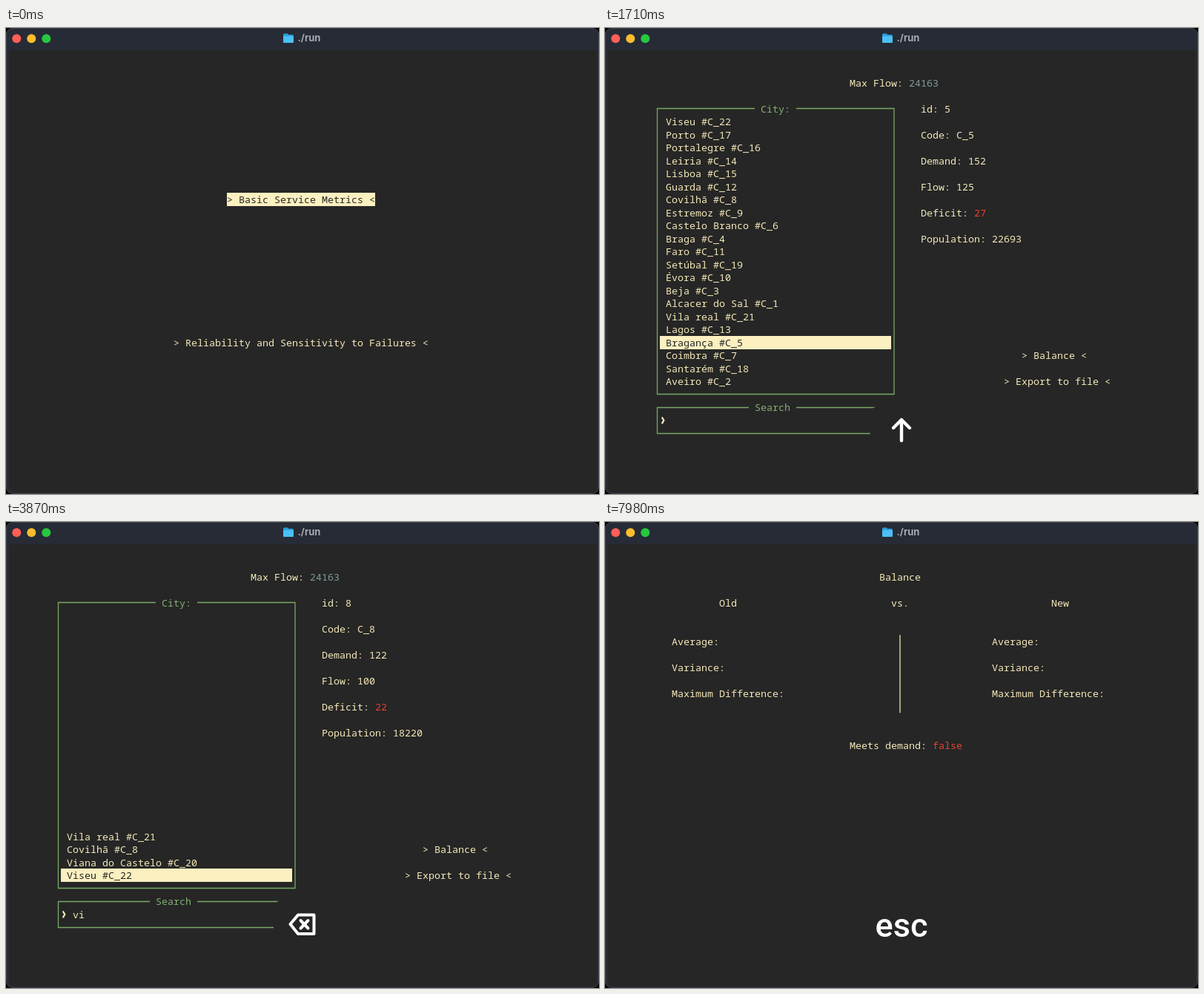
These frames come from a looping animation (800x628 px, 8000 ms). An HTML page with a canvas:

```html
<!DOCTYPE html>
<html lang="en">
<head>
<meta charset="utf-8">
<title>./run</title>
<style>
html, body { margin: 0; width: 100%; height: 100%; overflow: hidden; background: #000; }
canvas { display: block; width: 800px; height: 628px; }
</style>
</head>
<body>
<canvas id="stage" width="800" height="628"></canvas>
<script>
const ctx = document.getElementById('stage').getContext('2d');
const LOOP = 8000, LAG = 20, SETTLE = 330, HOLD = 840, FADE = 90;
const MONO = '500 13.333px "Noto Sans Mono", "DejaVu Sans Mono", monospace';
const C = {
  bg: '#262626', text: '#f4e8b8', bar: '#fcf0c0', green: '#83b072', line: '#78a866',
  slate: '#7f9a9a', olive: '#b5a824', red: '#e8412f'
};

const names = ['', 'Alcacer do Sal', 'Aveiro', 'Beja', 'Braga', 'Bragança', 'Castelo Branco',
  'Coimbra', 'Covilhã', 'Estremoz', 'Évora', 'Faro', 'Guarda', 'Lagos', 'Leiria', 'Lisboa',
  'Portalegre', 'Porto', 'Santarém', 'Setúbal', 'Viana do Castelo', 'Vila real', 'Viseu'];
// Both orders run from the bottom row upwards.
const startOrder = [2, 18, 7, 5, 13, 21, 1, 3, 10, 19, 11, 4, 6, 9, 8, 12, 15, 14, 16, 17, 22, 20];
const searchOrder = [22, 16, 14, 20, 12, 8, 19, 17, 10, 3, 9, 11, 21, 4, 13, 15, 1, 6, 5, 7, 18, 2];
// id: [demand, flow, population]
const stats = {
  2: [361, 361, 54162], 5: [152, 125, 22693], 7: [705, 705, 105842], 8: [122, 100, 18220],
  13: [151, 151, 22516], 16: [96, 96, 14318], 18: [200, 200, 30021], 21: [198, 198, 29574],
  22: [397, 330, 59469]
};
const keys = [
  [420, 'enter'], [1230, 'up'], [1440, 'up'], [1650, 'up'], [1860, 'up'],
  [2070, 'V'], [2250, 'I'], [2430, 'L'], [2610, 'A'],
  [3180, 'back'], [3540, 'back'], [3990, 'back'], [4290, 'back'], [4650, 'R'],
  [5760, 'back'], [6090, 'back'], [6570, 'right'], [7140, 'enter'], [7980, 'esc']
];

function stateAt(t) {
  const s = { screen: 'menu', list: startOrder, sel: 0, detail: 2, query: '', onButton: false };
  for (const [at, key] of keys) {
    if (t < at + LAG) break;
    if (key === 'enter') s.screen = s.onButton ? 'balance' : 'flow';
    else if (key === 'up') s.detail = s.list[++s.sel];
    else if (key === 'right') s.onButton = true;
    else {
      // The details follow the search one keystroke behind.
      s.detail = s.list[s.sel];
      s.query = key === 'back' ? s.query.slice(0, -1) : s.query + key.toLowerCase();
      s.list = searchOrder.filter(id => names[id].toLowerCase().includes(s.query));
      s.sel = 0;
    }
  }
  return s;
}

const cx = col => 2 + col * 8;
const rowTop = row => 29.75 + row * 17.5;
const mid = row => rowTop(row) + 8.75;

function print(col, row, str, color = C.text) {
  ctx.font = MONO;
  ctx.fillStyle = color;
  ctx.fillText(str, cx(col), Math.floor(mid(row) + 5.5));
}

function bar(col, row, cells) {
  ctx.fillStyle = C.bar;
  ctx.fillRect(cx(col), Math.round(rowTop(row)), cells * 8, 18);
}

function button(col, row, label, on) {
  const str = `> ${label} <`;
  if (on) bar(col, row, str.length);
  print(col, row, str, on ? C.bg : C.text);
}

function path(points, color, width, close) {
  ctx.beginPath();
  points.forEach(([x, y]) => ctx.lineTo(x, y));
  if (close) ctx.closePath();
  ctx.strokeStyle = color;
  ctx.lineWidth = width;
  ctx.stroke();
}

function box(top, bottom, col, title) {
  const y1 = Math.floor(mid(top)) + 0.5, y2 = Math.floor(mid(bottom)) + 0.5;
  path([[cx(col - 1), y1], [70.5, y1], [70.5, y2], [390, y2], [390, y1], [258, y1]], C.line, 1.3);
  print(col, top, title, C.green);
}

function roundRect(x, y, w, h, r, color) {
  ctx.beginPath();
  ctx.roundRect(x, y, w, h, r);
  ctx.fillStyle = color;
  ctx.fill();
}

function drawWindow() {
  ctx.fillStyle = '#000';
  ctx.fillRect(0, 0, 800, 628);
  roundRect(0, 0, 800, 628, 9, '#282b33');
  roundRect(0, 0, 800, 30, [9, 9, 0, 0], '#262b36');
  roundRect(4, 30, 793, 596, [0, 0, 6, 6], C.bg);
  ctx.beginPath();
  ctx.roundRect(0.5, 0.5, 799, 627, 8.5);
  ctx.strokeStyle = 'rgba(255, 255, 255, 0.1)';
  ctx.lineWidth = 1;
  ctx.stroke();
  ['#ff5f57', '#febc2e', '#28c840'].forEach((color, i) => {
    ctx.beginPath();
    ctx.arc(14.3 + i * 20, 14.3, 6, 0, 7);
    ctx.fillStyle = color;
    ctx.fill();
  });
  roundRect(374, 7.5, 7, 5, 1.5, '#2a9fdc');
  roundRect(374, 9, 14, 11, 1.5, '#2a9fdc');
  roundRect(374, 11, 14, 9, 1.5, '#4cc0f5');
  ctx.font = '700 13px Inter, "Liberation Sans", sans-serif';
  ctx.fillStyle = '#a6abb3';
  ctx.fillText('./run', 393.5, 18.3);
}

function drawMenu() {
  button(37, 11, 'Basic Service Metrics', true);
  button(28, 22, 'Reliability and Sensitivity to Failures', false);
}

function drawFlow(s) {
  print(41, 2, 'Max Flow:');
  print(51, 2, '24163', C.slate);
  box(4, 26, 26, 'City:');
  box(27, 29, 25, 'Search');
  s.list.slice(0, 21).forEach((id, i) => {
    const on = i === s.sel;
    if (on) bar(9, 25 - i, 39);
    print(10, 25 - i, `${names[id]} #C_${id}`, on ? C.bg : C.text);
  });
  path([[76.8, 524.5], [79.3, 528.8], [76.8, 533.2]], C.bar, 2.2);
  print(11, 28, s.query);

  const [demand, flow, people] = stats[s.detail], deficit = demand - flow;
  print(53, 4, `id: ${s.detail}`);
  print(53, 6, `Code: C_${s.detail}`);
  print(53, 8, `Demand: ${demand}`);
  print(53, 10, `Flow: ${flow}`);
  print(53, 12, 'Deficit:');
  print(62, 12, `${deficit}`, deficit ? C.red : C.olive);
  print(53, 14, `Population: ${people}`);
  button(70, 23, 'Balance', s.onButton);
  button(67, 25, 'Export to file', false);
}

function drawBalance() {
  print(46, 2, 'Balance');
  print(19, 4, 'Old');
  print(48, 4, 'vs.');
  print(75, 4, 'New');
  for (const col of [11, 65]) {
    ['Average:', 'Variance:', 'Maximum Difference:'].forEach((label, i) => print(col, 7 + i * 2, label));
  }
  path([[398, rowTop(7)], [398, rowTop(13)]], '#d8cb9c', 1.5);
  print(41, 15, 'Meets demand:');
  print(55, 15, 'false', C.red);
}

function drawGlyph(key) {
  const white = '#fff';
  ctx.lineCap = ctx.lineJoin = 'round';
  if (key === 'up' || key === 'right') {
    ctx.save();
    ctx.translate(400, 542);
    if (key === 'right') ctx.rotate(Math.PI / 2);
    path([[0, 14], [0, -14]], white, 4.4);
    path([[-11, -3], [0, -14], [11, -3]], white, 4.4);
    ctx.restore();
  } else if (key === 'back') {
    path([[383.5, 542], [394, 529.5], [415.5, 529.5], [415.5, 555], [394, 555]], white, 4, true);
    path([[397.5, 537], [407.5, 547.5]], white, 4);
    path([[407.5, 537], [397.5, 547.5]], white, 4);
  } else if (key === 'enter') {
    path([[413, 530], [413, 546], [387, 546]], white, 4.4);
    path([[396, 537], [387, 546], [396, 555]], white, 4.4);
  } else {
    ctx.font = '500 45px Roboto, "Liberation Sans", sans-serif';
    ctx.textAlign = 'center';
    ctx.fillStyle = white;
    ctx.fillText(key, 400, 558.5);
  }
}

function drawKey(t) {
  const hit = keys.filter(k => k[0] <= t).pop();
  if (!hit) return;
  const age = t - hit[0], alpha = 1 - Math.max(0, age - HOLD) / FADE;
  if (alpha <= 0) return;
  const rest = 1 - Math.min(1, age / SETTLE);
  const half = 39 + 6 * rest ** 3;
  ctx.save();
  ctx.globalAlpha = alpha;
  roundRect(400 - half, 509.5, half * 2, 65, 12, C.bg);
  drawGlyph(hit[1]);
  ctx.restore();
}

function draw(t) {
  const s = stateAt(t);
  drawWindow();
  if (s.screen === 'menu') drawMenu();
  else if (s.screen === 'flow') drawFlow(s);
  else drawBalance();
  drawKey(t);
}

const start = performance.now();
function tick() {
  draw((performance.now() - start) % LOOP);
  requestAnimationFrame(tick);
}
tick();
</script>
</body>
</html>
```
